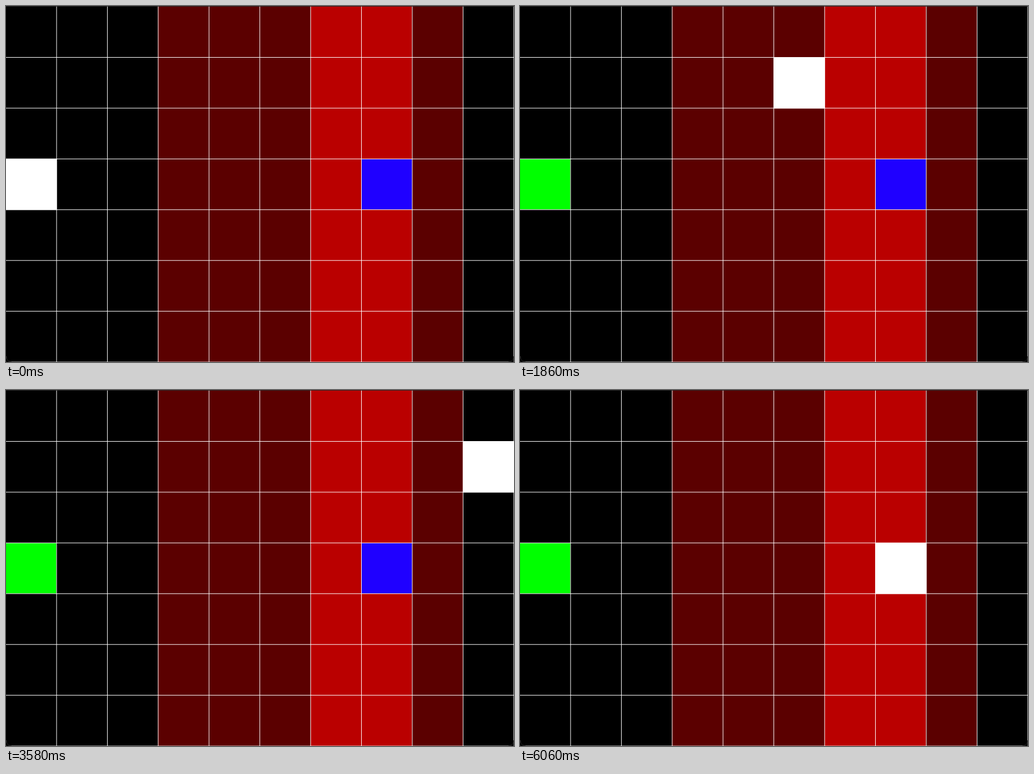
An HTML page with a canvas for the animation above (6.08 s loop, 894 by 627 pixels).

```html
<!DOCTYPE html>
<html lang="en">
<head>
<meta charset="utf-8">
<title>Windy gridworld</title>
<style>
html, body { margin: 0; width: 100%; height: 100%; overflow: hidden; background: #000; }
canvas { display: block; width: 894px; height: 627px; }
</style>
</head>
<body>
<canvas id="grid" width="894" height="627"></canvas>
<script>
const LOOP = 6080, BEAT = 500, FIRST = 80;
const W = 894, H = 627, PITCH = 89.42, ROWS = 7;
const WIND = [0, 0, 0, 1, 1, 1, 2, 2, 1, 0];
const SHADE = ['#000', '#5b0000', '#ba0000'];
const START = [0, 3], GOAL = [7, 3];
const MOVES = 'R'.repeat(9) + 'D'.repeat(4) + 'L'.repeat(2);

const ctx = document.getElementById('grid').getContext('2d');

// the wind of the column being left pushes the agent up
function move([col, row], dir) {
  const dx = dir === 'R' ? 1 : dir === 'L' ? -1 : 0;
  const dy = (dir === 'D' ? 1 : 0) - WIND[col];
  return [col + dx, Math.max(0, row + dy)];
}

// five moves take four beats: the third comes just ahead of the fourth
function moveTime(i) {
  const beat = i - Math.floor((i + 2) / 5);
  return FIRST + BEAT * beat - (i % 5 === 2 ? 60 : 0);
}

function agentAt(time) {
  let pos = START;
  for (let i = 0; i < MOVES.length && moveTime(i) <= time; i++) {
    pos = move(pos, MOVES[i]);
  }
  return pos;
}

// start of the grid line that closes column or row i
const lineX = i => 88.5 + PITCH * i;
const lineY = i => 90 + PITCH * i;

function rect(color, x, y, w, h) {
  ctx.fillStyle = color;
  ctx.fillRect(x, y, w, h);
}

function cell(color, [col, row]) {
  rect(color, lineX(col - 1) + 1, lineY(row - 1) + 1, PITCH - 1, PITCH - 1);
}

function corner(x, dir) {
  ctx.beginPath();
  ctx.moveTo(x, 617);
  ctx.quadraticCurveTo(x, 626.5, x + dir * 9, 626.5);
  ctx.strokeStyle = '#444';
  ctx.stroke();
  ctx.lineTo(x, H);
  ctx.fillStyle = '#000';
  ctx.fill();
}

function draw(time) {
  WIND.forEach((wind, col) => {
    rect(SHADE[wind], Math.round(lineX(col - 1)), 0, PITCH + 1, H);
  });
  cell('#00ff00', START);
  cell('#1f00ff', GOAL);

  WIND.forEach((_, col) => rect('#fff', lineX(col), 1, 1, H));
  for (let row = 0; row < ROWS; row++) rect('#fff', 0, lineY(row), W, 1);

  const [col, row] = agentAt(time);
  rect('#fff', lineX(col - 1), lineY(row - 1), PITCH + 1, PITCH + 1);

  rect('#2a2a2a', 0, 0, W, 1);
  corner(0.5, 1);
  corner(W - 0.5, -1);
}

const begin = performance.now();
function tick() {
  draw((performance.now() - begin) % LOOP);
  requestAnimationFrame(tick);
}
tick();
</script>
</body>
</html>
```
